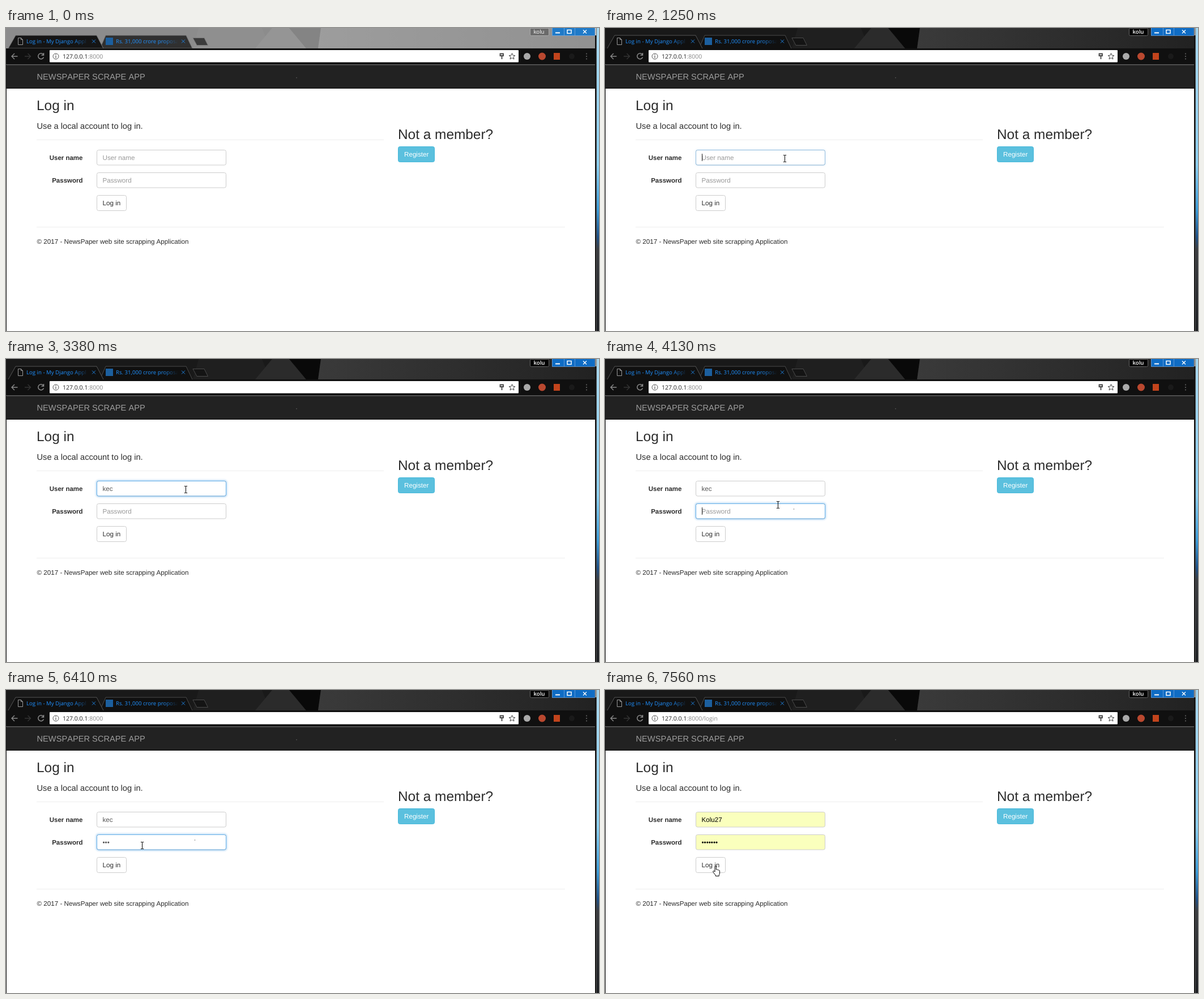
These frames come from a looping animation (1047x535 px, 8 s). An HTML page:

```html
<!DOCTYPE html>
<html lang="en">
<head>
<meta charset="utf-8">
<title>Log in</title>
<style>
  html, body { margin: 0; width: 100%; height: 100%; overflow: hidden; background: #fff; }
  svg { display: block; width: 1047px; height: 535px; }
  text {
    font: 11.65px "Liberation Sans", Arial, sans-serif; font-kerning: none;
    text-rendering: geometricPrecision; fill: #2c2c2c; white-space: pre;
  }
  .h2 { font-size: 24.4px; }
  .h4 { font-size: 14.65px; }
  .b { font-size: 11.5px; font-weight: bold; }
  .ui { font: 9.65px "Open Sans", "Noto Sans", sans-serif; }
  .url { font-size: 10.5px; }
  .item { font-size: 10px; font-weight: bold; fill: #000; }
  .line { fill: none; stroke-width: 1; }
  .glow { stroke: #66afe9; stroke-width: 4; filter: url(#blur); }
</style>
</head>
<body>
<svg viewBox="0 0 1047 535">
  <defs>
    <filter id="blur" x="-10%" y="-60%" width="120%" height="220%"><feGaussianBlur stdDeviation="1.5"/></filter>
    <linearGradient id="facet">
      <stop offset="0" stop-color="#3a3a3a"/><stop offset="1" stop-color="#222"/>
    </linearGradient>
    <linearGradient id="desk" x2="0" y2="1">
      <stop offset="0" stop-color="#a9d8f0"/><stop offset=".45" stop-color="#8cd0f2"/>
      <stop offset=".6" stop-color="#3a9bd8"/><stop offset=".69" stop-color="#1d4f86"/>
      <stop offset=".73" stop-color="#3a3c40"/><stop offset="1" stop-color="#1c1e22"/>
    </linearGradient>
    <linearGradient id="fadeA" gradientUnits="userSpaceOnUse" x1="120" x2="146" y1="0" y2="0">
      <stop offset="0" stop-color="#1e90ff"/><stop offset="1" stop-color="#1e90ff" stop-opacity="0"/>
    </linearGradient>
    <linearGradient id="fadeB" gradientUnits="userSpaceOnUse" x1="278" x2="304" y1="0" y2="0">
      <stop offset="0" stop-color="#1e90ff"/><stop offset="1" stop-color="#1e90ff" stop-opacity="0"/>
    </linearGradient>
  </defs>

  <!-- window frame: dark glass, veiled in white while the window is idle -->
  <rect width="1041" height="37" fill="#191919"/>
  <path d="M340 0H452L466 36H330Z" fill="#1f1f1f"/>
  <path d="M470 0H500L530 36H440Z" fill="#2b2b2b"/>
  <path d="M500 0H556L551 36H530Z" fill="#090909"/>
  <path d="M556 0H1041V36H551Z" fill="url(#facet)"/>
  <g id="idle">
    <rect width="1041" height="37" fill="#fff" opacity=".5"/>
    <path d="M166 36L176 13H318L329 36Z" fill="#303030" stroke="#777"/>
    <path d="M4 36L17 13H160L172 36Z" fill="#151515" stroke="#777"/>
    <path d="M330 17.5H350L356.500 30.500H337Z" fill="#3b3b3b" stroke="#777"/>
    <rect x="925.5" y=".5" width="33" height="13" rx="2" fill="#6a6a6a" stroke="#aaa"/>
    <rect x="964" width="76" height="13.500" fill="#1f7ac8"/>
  </g>
  <g id="active">
    <path d="M166 36L176 13H318L329 36" fill="#101010" stroke="#4a4a4a"/>
    <path d="M4 36L17 13H160L172 36" fill="#101010" stroke="#555"/>
    <path d="M330 17.5H350L356.500 30.500H337Z" fill="#141414" stroke="#4a4a4a"/>
    <rect x="925.5" y=".5" width="33" height="13" rx="2" fill="#000" stroke="#666"/>
    <rect x="964" width="76" height="13.500" fill="#0f6cc4"/>
  </g>
  <path d="M985.5 0V13M1004.500 0V13M964.500 0V13.500H1039.500V0" class="line" stroke="#8fb6e4" opacity=".6"/>
  <path d="M970 8.500H978" stroke="#fff" stroke-width="2"/>
  <rect x="991" y="3.500" width="7" height="6" class="line" stroke="#fff" style="stroke-width:1.5"/>
  <path d="M1019 3.500L1025 9.500M1025 3.500L1019 9.500" stroke="#fff" stroke-width="1.3"/>
  <text id="badge" class="ui" x="931.5" y="10" style="fill:#fff">kolu</text>

  <path id="pageIcon" d="M21.500 17.500H26.500L29.500 20.500V29.500H21.500ZM26.500 17.500V20.500H29.500" class="line" stroke="#999"/>
  <path id="spinner" d="M25.500 18.500A5 5 0 1 1 20.500 23.500" class="line" stroke="#8ab4e8" style="stroke-width:1.5"/>
  <text class="ui" x="36" y="27" style="fill:url(#fadeA)">Log in - My Django Appl</text>
  <rect x="176" y="17" width="13" height="13" fill="#1c5f9e"/>
  <text class="ui" x="194" y="27" style="fill:url(#fadeB)">Rs. 31,000 crore proposa</text>
  <path d="M152 20.500L158 26.500M158 20.500L152 26.500M310 20.500L316 26.500M316 20.500L310 26.500" stroke="#1e80dd"/>

  <!-- toolbar -->
  <rect y="36" width="1041" height="30" fill="#101010"/>
  <path d="M20.500 50H10M15 45L10 50L15 55" class="line" stroke="#8a8a8a" style="stroke-width:1.4"/>
  <path d="M33 50H43.500M38.500 45L43.500 50L38.500 55" class="line" stroke="#333" style="stroke-width:1.4"/>
  <g class="line" stroke="#8a8a8a" style="stroke-width:1.5">
    <path id="reload" d="M66 47A5 5 0 1 0 66.500 51.500M66.500 44V48H62.500"/>
    <path id="stop" d="M57 45.500L66 54.500M66 45.500L57 54.500"/>
  </g>
  <rect x="77" y="39" width="828" height="21.500" rx="1" fill="#fff"/>
  <circle cx="88" cy="50" r="5" class="line" stroke="#555"/>
  <path d="M88 49V53M88 46.500V48" stroke="#555" stroke-width="1.2"/>
  <text class="ui url" x="100" y="54" style="fill:#222">127.0.0.1<tspan id="path" fill="#888"></tspan></text>
  <path id="key" d="M872.500 45.500H878V49H872.500ZM875.500 49V55" fill="none" stroke="#444" stroke-width="1.8"/>
  <path d="M893.500 44.500L895 48.300L899 48.500L896 51L897 55L893.500 52.800L890 55L891 51L888 48.500L892 48.300Z" class="line" stroke="#444"/>
  <circle cx="920" cy="50" r="6" fill="#aaa"/>
  <circle cx="946.500" cy="50" r="6.500" fill="#b9482f"/>
  <rect x="967" y="44" width="11" height="12" fill="#c2441c"/>
  <circle cx="999" cy="50" r="5" fill="#1a1a1a"/>
  <path d="M1025 44.500V46.500M1025 49V51M1025 53.500V55.500" stroke="#555" stroke-width="2"/>
  <path d="M0 65H1041" stroke="#aaa"/>

  <!-- page -->
  <rect y="65.500" width="1041" height="41.500" fill="#222"/>
  <path d="M0 106.500H1041" stroke="#080808"/>
  <rect x="512.500" y="87" width="1" height="1.500" fill="#777"/>
  <text class="h4" x="54.500" y="90.500" style="fill:#9d9d9d">NEWSPAPER SCRAPE APP</text>
  <text class="h2" x="54" y="145">Log in</text>
  <text class="h4" x="54.500" y="178">Use a local account to log in.</text>
  <path d="M54 197.500H667M54 351.500H987" stroke="#eee"/>
  <text class="b" x="135.500" y="233" text-anchor="end">User name</text>
  <text class="b" x="135.500" y="273" text-anchor="end">Password</text>
  <text class="h2" x="692" y="196">Not a member?</text>
  <rect x="692.500" y="209.500" width="64" height="27" rx="3" fill="#5bc0de" stroke="#46b8da"/>
  <text x="703" y="227" style="fill:#fff">Register</text>
  <text x="54.500" y="381">© 2017 - NewsPaper web site scrapping Application</text>

  <g id="fields"></g>
  <rect id="speck" x="333" y="264" width="1" height="2" fill="#888"/>
  <rect id="button" x="160.500" y="295.500" width="52" height="27" rx="3"/>
  <path id="pressed" d="M162 297H211.500" stroke="#000" stroke-width="2" opacity=".1"/>
  <text x="170.500" y="313">Log in</text>
  <g id="menu"></g>
  <rect id="caret" width="1" height="13" fill="#222"/>

  <!-- window edge and desktop -->
  <path d="M.5 65V535" stroke="#111"/>
  <rect x="1040" y="13" width="3" height="522" fill="#111"/>
  <path d="M1042.500 0V535" stroke="#555"/>
  <rect x="1043" width="4" height="535" fill="url(#desk)"/>

  <g id="cursor">
    <path id="beam" d="M-2.500 -6H-.5L0 -5.500L.5 -6H2.500M0 -5.500V5.500M-2.500 6H-.5L0 5.500L.5 6H2.500" class="line" stroke="#000"/>
    <path id="arrow" d="M.5 .5V13L3.300 10.300L5.300 15H7.300L5.300 10H9.500Z" fill="#fff" stroke="#000" stroke-width=".9"/>
    <path id="hand" d="M4 11V1.800a1.100 1.100 0 0 1 2.200 0V7q1.800-1 2.300.6q1.800-.8 2.200.7q1.700-.5 1.800 1.200V13q0 2-1.200 3.500V18.500H5.200V17Q2.500 14 .9 11.200q-.8-1.600.7-1.800Q3 9.300 4 11Z" fill="#fff" stroke="#000"/>
  </g>
</svg>
<script>
const LOOP = 8000;
const $ = id => document.getElementById(id);
const show = (id, on) => $(id).style.display = on ? '' : 'none';
const within = (t, a, b) => t >= a && t < b;

// Each track is a list of [start time, ...values], held until the next entry.
const at = (track, t) => track.findLast(step => step[0] <= t).slice(1);

const cursorTrack = [
  [0, ''], [180, 'arrow', 735, 369], [290, 'arrow', 639, 300],
  [510, 'arrow', 560, 281], [610, 'arrow', 446, 250], [720, 'beam', 375.5, 233.5],
  [930, 'beam', 334.5, 231.5], [1040, 'beam', 317.5, 230.5],
  [3590, 'beam', 325.5, 239.5], [3700, 'arrow', 331, 247], [3800, 'beam', 333.5, 263.5],
  [3910, 'beam', 314.5, 259.5], [4010, 'beam', 305.5, 257.5],
  [6200, 'arrow', 298, 246], [6310, 'beam', 272.5, 262.5], [6410, 'beam', 240.5, 274.5],
  [6510, 'arrow', 219, 287], [6620, 'hand', 202, 305], [6720, 'hand', 195, 308],
  [6830, 'hand', 190, 310]
];
const caretTrack = [
  [0], [1250, 171, 222], [1880], [2000, 177, 222], [2520, 184, 222], [2850, 190, 222],
  [3380], [3910, 190, 222], [4010], [4130, 171, 262], [4670], [4900, 175, 262],
  [5230, 179, 262], [5440, 183, 262], [5990], [6520, 183, 262], [6930]
];
const menuTrack = [
  [0], [1880, 242.5, 'Kolu27', 'demo7'], [2000, 242.5, 'Kolu27'], [2620],
  [4220, 282.5, 'Use password for:', 'Kolu27', 'demo7'], [4900]
];
const buttonTrack = [[0, '#fff', '#ccc'], [6620, '#e6e6e6', '#adadad'], [6930, '#e6e6e6', '#8c8c8c'], [7250, '#fff', '#ccc']];
const fields = [
  { y: 215.5, hint: 'User name',
    text: [[0, ''], [2000, 'k'], [2520, 'ke'], [2850, 'kec'], [7250, ''], [7460, 'Kolu27']],
    focus: [[0, 0], [1250, .6], [1340, 1], [4010, .5], [4130, 0]] },
  { y: 255.5, hint: 'Password',
    text: [[0, ''], [4900, '•'], [5230, '••'], [5440, '•••'], [7250, ''], [7460, '•••••••']],
    focus: [[0, 0], [4010, .5], [4130, 1], [6930, .55], [7050, 0]] }
];

function fieldMarkup(field, t) {
  const [text] = at(field.text, t), [focus] = at(field.focus, t);
  const filled = t >= 7460;
  const box = `x="160.500" y="${field.y}" width="228" height="26.500" rx="3"`;
  const color = filled ? '#000' : text ? '#555' : '#999';
  return `<rect ${box} class="glow" fill="none" opacity="${.45 * focus ** 3}"/>
    <rect ${box} fill="${filled ? '#faffbd' : '#fff'}" stroke="#ccc"/>
    <rect ${box} fill="none" stroke="#66afe9" opacity="${focus}"/>
    <text x="170.500" y="${field.y + 17.5}" style="fill:${color}">${text || field.hint}</text>`;
}

function menuMarkup([y, ...items]) {
  if (!items.length) return '';
  const rows = items.map((item, i) => `<text class="ui item" x="168" y="${y + 14 + i * 19.7}">${item}</text>`);
  return `<rect x="160.500" y="${y}" width="229" height="${items.length * 20 + .5}" fill="#fff" stroke="#c8c8c8"/>` + rows.join('');
}

function draw(t) {
  const active = t >= 1250, loading = within(t, 7050, 7460);
  show('idle', !active);
  show('active', active);
  $('badge').style.fontWeight = active ? 600 : 400;
  show('pageIcon', !loading);
  show('spinner', loading);
  $('spinner').setAttribute('transform', `rotate(${Math.floor(t / 105) * 75} 25.5 23.5)`);
  show('reload', !loading);
  show('stop', loading);
  show('key', !within(t, 7250, 7560));
  $('path').textContent = t >= 7250 ? ':8000/login' : ':8000';

  $('fields').innerHTML = fields.map(field => fieldMarkup(field, t)).join('');
  $('menu').innerHTML = menuMarkup(at(menuTrack, t));
  show('speck', within(t, 4010, 7250));

  const [fill, stroke] = at(buttonTrack, t);
  $('button').setAttribute('fill', fill);
  $('button').setAttribute('stroke', stroke);
  show('pressed', within(t, 6930, 7050));

  const [cx, cy] = at(caretTrack, t);
  show('caret', cx);
  if (cx) $('caret').setAttribute('transform', `translate(${cx} ${cy})`);

  const [shape, x = 0, y = 0] = at(cursorTrack, t);
  for (const id of ['beam', 'arrow', 'hand']) show(id, id === shape);
  $('cursor').setAttribute('transform', `translate(${x} ${y})`);
}

const start = performance.now();
function tick() {
  draw((performance.now() - start) % LOOP);
  requestAnimationFrame(tick);
}
tick();
</script>
</body>
</html>
```
